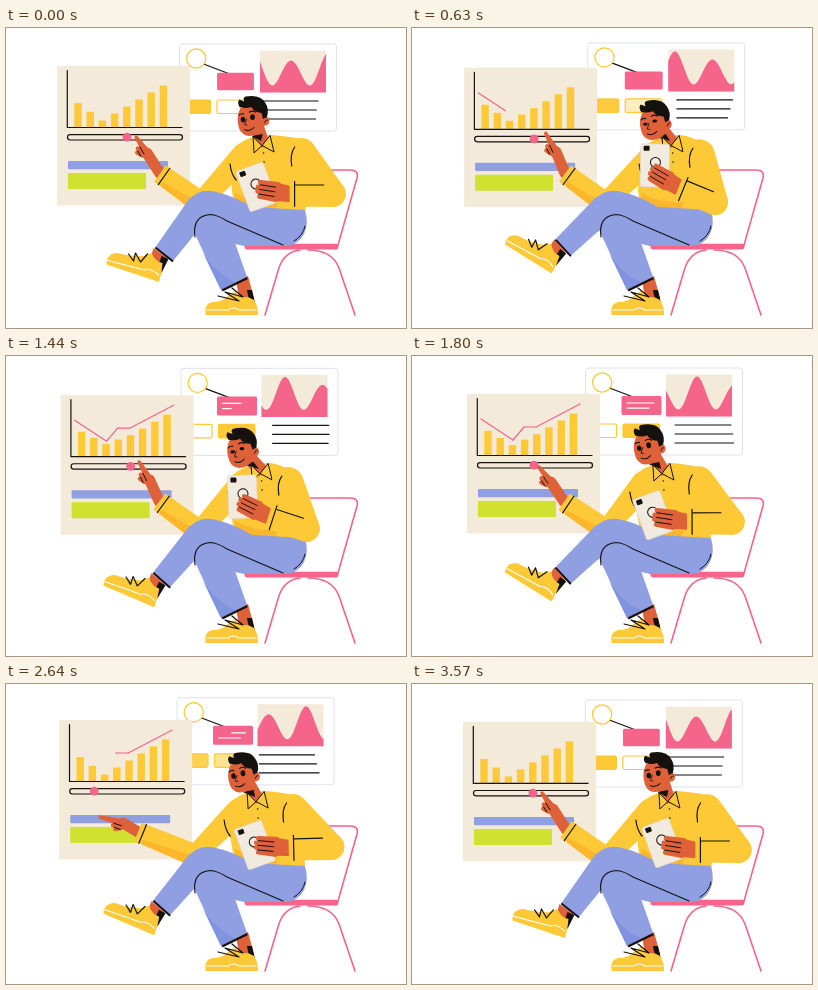
Write an HTML page that moves like this. It is 400 px wide and 300 px high and loops after 3.6 s.

```html
<!DOCTYPE html>
<html lang="en">
<head>
<meta charset="utf-8">
<title>Analyst at work</title>
<style>
html, body { margin: 0; width: 100%; height: 100%; overflow: hidden; background: #fff; }
svg { display: block; width: 400px; height: 300px; }
</style>
</head>
<body>
<svg id="stage" viewBox="0 0 400 300" stroke-linecap="round" stroke-linejoin="round"></svg>
<script>
const LOOP = 3600;
const YELLOW = '#fdc936', AMBER = '#fbb62c', PINK = '#f5648b', BLUE = '#909fe2', SHADE = '#8192de',
  GREEN = '#d0e22f', SKIN = '#de6139', BEIGE = '#f3ead9', INK = '#15110f';
const stage = document.getElementById('stage');

// ---- motion: a few signals drive everything ----
let now = 0, lean = 0, lift = 0, reach = 0;
const clamp = x => Math.max(0, Math.min(1, x));
const ramp = (a, b) => clamp((now - a) / (b - a));
const ease = (a, b) => (1 - Math.cos(Math.PI * ramp(a, b))) / 2;
const pulse = (a, b, c, d) => ease(a, b) * (1 - ease(c, d));
const swing = (peak, cycles = 1) => Math.cos(2 * Math.PI * cycles * (now - peak) / LOOP);

function setSignals(ms) {
  now = ms % LOOP;
  lean = 0.5 + 0.5 * swing(2200);           // torso towards the boards
  lift = pulse(200, 950, 1150, 1750);       // tablet up to the face
  reach = pulse(1650, 2450, 2750, 3560);    // slider dragged left
}
// A point at rest, moved sideways by lean and in any direction by lift and reach.
const joint = ([x, y], byLean, byLift, byReach) => [
  x + byLean * lean + byLift[0] * lift + byReach[0] * reach,
  y + byLift[1] * lift + byReach[1] * reach
];
const mix = (a, b, k) => [a[0] + (b[0] - a[0]) * k, a[1] + (b[1] - a[1]) * k];

// ---- drawing helpers ----
const r2 = x => Math.round(x * 100) / 100;
const xy = p => p.map(r2).join();
const fill = (d, c) => `<path d="${d}" fill="${c}"/>`;
const line = (d, c = INK, w = 1.2) => `<path d="${d}" fill="none" stroke="${c}" stroke-width="${w}"/>`;
const seg = (a, b, c, w) => line(`M${xy(a)}L${xy(b)}`, c, w);
const rect = (x, y, w, h, c, rx = 0, more = '') =>
  `<rect x="${r2(x)}" y="${r2(y)}" width="${r2(w)}" height="${r2(h)}" rx="${rx}" fill="${c}" ${more}/>`;
const oval = (x, y, rx, ry, c) => `<ellipse cx="${r2(x)}" cy="${r2(y)}" rx="${rx}" ry="${r2(ry)}" fill="${c}"/>`;
const group = (x, y, body, turn = '') => `<g transform="translate(${r2(x)} ${r2(y)}) ${turn}">${body}</g>`;
const rotate = (a, x = 0, y = 0) => `rotate(${r2(a)} ${x} ${y})`;

// Frame along a to b: shifts a point along and across that direction.
function axis(a, b) {
  const dx = b[0] - a[0], dy = b[1] - a[1], l = Math.hypot(dx, dy) || 1;
  return (p, along, across) => [p[0] + (dx * along - dy * across) / l, p[1] + (dy * along + dx * across) / l];
}
function limb(a, ra, b, rb, c, round = true) {
  const off = axis(a, b), end = round ? `A${rb},${rb} 0 0 1 ` : 'L';
  return fill(`M${xy(off(a, 0, ra))}A${ra},${ra} 0 0 1 ${xy(off(a, 0, -ra))}L${xy(off(b, 0, -rb))}`
    + `${end}${xy(off(b, 0, rb))}Z`, c);
}

// ---- boards ----
const TREND = [[14, 25], [46, 46], [57, 33], [69, 33], [113, 10]];

function trend(from, to) {
  const lens = TREND.slice(1).map((p, i) => Math.hypot(p[0] - TREND[i][0], p[1] - TREND[i][1]));
  const total = lens.reduce((a, b) => a + b);
  let s = 0, out = '';
  lens.forEach((l, i) => {
    const a = clamp((from * total - s) / l), b = clamp((to * total - s) / l);
    if (b > a) out += seg(mix(TREND[i], TREND[i + 1], a), mix(TREND[i], TREND[i + 1], b), PINK);
    s += l;
  });
  return out;
}

function chartBoard() {
  const swell = pulse(450, 1050, 1050, 2500);
  let s = rect(0, 0, 133, 139.5, BEIGE, 1);
  for (let i = 0; i < 8; i++) {
    const k = i - 2;
    const h = 6.5 + (k < 0 ? -8.7 : 7) * k + 7 * swell * Math.exp(-k * k / 1.6);
    s += rect(17.3 + i * 12.2, 61 - h, 7.4, h, YELLOW);
  }
  s += line('M10.3,4.5V61.5H125') + trend(ramp(2000, 3360), ramp(375, 1290));
  s += rect(10.5, 68.6, 115, 5.4, 'none', 2.7, `stroke="${INK}" stroke-width="1.2"`);
  s += oval(70 - 35 * reach, 71.2, 4.4, 4.4, PINK);
  s += rect(11, 95, 100, 8.3, BLUE, 1) + rect(11, 107, 78, 16, GREEN, 1);
  return group(53 - 2 * swing(0), 38 + 2 * swing(900), s);
}

function wave() {
  const peak = 74 + 75 * now / LOOP;
  let d = 'M80.5,48.5';
  for (let x = 80.5; x <= 146.5; x += 1.5) {
    const a = 2 * Math.PI * (x - peak) / 75;
    d += `L${x},${r2(41.5 - (29 + 4 * Math.cos(a)) * (0.5 + 0.5 * Math.cos(2 * a)))}`;
  }
  return fill(d + 'V48.5Z', PINK);
}

function reportBoard() {
  const edge = `stroke="${YELLOW}" stroke-width="1.2"`;
  let s = rect(0, 0, 157, 87, '#fff', 3, 'stroke="#d9dbea" stroke-width="0.8"');
  s += seg([24, 20], [49, 29.5]);
  s += `<circle cx="16.7" cy="14.5" r="9.6" fill="#fff" ${edge}/>`;

  const k = 0.92 + 0.08 * pulse(200, 1300, 2650, 3300);
  s += rect(56 - 20 * k, 37.5 - 9.5 * k, 40 * k, 19 * k, PINK, 1.5);
  for (const i of [0, 1]) {
    const w = 27 - 5 * i, x = 41.5, y = 35 + 5.2 * i;
    const a = ramp(2470 + 170 * i, 2820 + 170 * i), b = ramp(1200 + 100 * i, 1550 + 100 * i);
    if (b > a) s += seg([x + w * a, y], [x + w * b, y], '#fff');
  }

  const swap = pulse(400, 1000, 2300, 3000);
  const cell = (x, w, o) => rect(x, 56, w, 13.5, YELLOW, 1.5, `fill-opacity="${r2(o)}" ${edge}`);
  s += cell(6, 25, 1 - swap ** 3) + cell(37.5, 36.5, swap);

  for (let i = 0; i < 3; i++)
    s += seg([86.5 + 5.5 * swing(1250), 57 + 9 * i], [142 + 6 * swing(1250 + 250 * i), 57 + 9 * i]);
  s += rect(80.5, 6.5, 66, 42, BEIGE) + wave();
  return group(173.5 + 2.5 * swing(900), 14 + 2 * swing(0), s);
}

// ---- chair and legs ----
const CHAIR = line('M296,142H344Q353,142 351,150L332,217', PINK, 1.6)
  + line('M259,287L272,243Q277,224 294,222', PINK, 1.6)
  + line('M302,222Q326,222 333,240L349,287', PINK, 1.6)
  + rect(238.5, 215.8, 94, 5.6, PINK, 2.4);

const STANDING_FOOT = fill('M230,252L242,248L248,270L233,270Z', SKIN)
  + fill('M241,262L246,262L249,275L243,273Z', INK)
  + fill('M199.5,287Q198,275 207,274Q216,274 222,268L229,263Q233,270 242,269L248,272Q252,278 252,287Z', YELLOW)
  + line('M201,282H222Q227,278 233,282H250', '#fff', 1.1)
  + line('M212,268L233,273L219,264L237,269L226,260');

const STANDING_SHIN = fill('M189,206Q187,187 205,187Q219,188 228,212L241,249L215,262Z', BLUE)
  + fill('M197,225Q210,246 230,254.5L215,262Z', SHADE)
  + line('M217,262L240.5,250.5', INK, 2.4);

const THIGHS = fill('M183,172Q192,161 206,163Q226,167 246,179L299,182Q303,196 298,206Q292,217 280,218H238L190,207Z', BLUE)
  + line('M189,209Q186,188 204,186.5Q212,187 221,193L277,217', INK, 1.1)
  + line('M288,213Q297,208 299,198', INK, 1);

const SHOE = fill('M102,237.5Q102,226 113,226Q126,230 139,229L147,226Q151,235 158,236L157,245L154.5,255Z', YELLOW)
  + line('M103.5,233.5L140,243Q147,241 154,248', '#fff', 1.1)
  + line('M124,227L129,234L131,226L136,235L143,227');

function crossedLeg() {
  const up = 1 - swing(0, 3);
  const foot = fill('M149,221L163,231L156,243L146,231Z', SKIN)
    + fill('M157,229L164,232L157,246L154,238Z', INK) + SHOE;
  return group(0, 0, group(-1.5, -1, foot, rotate(2.3 * up, 157, 228))
    + fill('M183,171Q198,160 213,176L208,191L189,206L167,233L149.5,219Z', BLUE)
    + line('M150,220L166.5,233', INK, 2), rotate(4.5 * up, 197, 178));
}

// ---- upper body ----
function reachArm(neck) {
  const sh = [neck - 19, 128];
  const el = joint([194, 174], 0, [-2, 1], [-6, -3]);
  const cuff = joint([154, 145.5], 0, [-1.5, 0], [-22, 2.5]);
  const palm = joint([141, 125], 0, [5, -2], [-24, 14]);
  const tip = joint([130, 109], 0, [6, -6], [-36, 24]);
  const arm = axis(el, cuff), hand = axis(palm, tip);
  return limb(cuff, 5.5, palm, 5.5, SKIN) + limb(palm, 4, tip, 1.7, SKIN)
    + limb(hand(palm, 2, -3), 3, hand(palm, 9, -5), 2.2, SKIN)
    + limb(hand(palm, 1, -5), 2.6, hand(palm, 6, -8), 2, SKIN)
    + seg(hand(palm, 9, -2.5), hand(palm, 1, -3), INK, 1)
    + seg(hand(palm, 7, -6.5), hand(palm, 1, -7), INK, 1)
    + limb(sh, 13, el, 9, YELLOW) + limb(el, 11, cuff, 10, YELLOW, false)
    + limb(arm(el, 0, -6), 5, arm(cuff, -9, -7.5), 2.2, AMBER)
    + seg(arm(cuff, -5, 10), arm(cuff, -5, -10));
}

function torso(n, sh) {
  const x = v => r2(n + v);
  return fill(`M${x(-11)},109Q${x(-26)},114 ${x(-32)},126L226,163L230,186H299L${xy([sh[0] + 11, sh[1] + 10])}`
    + `L${xy([sh[0] - 4, sh[1] - 16])}Q${x(14)},107 ${x(6)},107Z`, YELLOW)
    + fill('M229,165Q250,176 272,174L268,184H231Z', AMBER)
    + line(`M${x(-33)},136Q${x(-32)},146 ${x(-27)},152`);
}

function collar(n) {
  const x = v => r2(n + v);
  return oval(n + 0.5, 125, 0.8, 0.8, INK) + oval(n + 1, 134, 0.8, 0.8, INK)
    + `<path d="M${x(-10)},109L${x(-9)},125L${x(-1)},117.5L${x(11)},124L${x(7)},107.5L${x(-1)},117.5Z" `
    + `fill="${YELLOW}" stroke="${INK}" stroke-width="1"/>`;
}

const HAIR = 'M235,80Q231,75 234,71.5L239,73.5Q237,70 240,68.5Q255,66 260,75Q264,81 261.5,89L257.5,91'
  + 'L256,85Q248,84 246,79Q240,81 235,79Z';

function headAndNeck(n) {
  const dx = 1 - 12 * lean - 6 * lift, open = 1 - lift;
  let s = fill('M235,80Q231,88 232.5,96Q234,107 243,108Q255,108 259,98L261,82L247,76Z', SKIN);
  s += oval(260, 93, 3.8, 4.6, SKIN) + line('M259,95Q260,91 262,92', INK, 0.8) + fill(HAIR, INK);
  s += oval(237.5, 91.5, 2.3, 0.6 + 2.2 * open, INK) + oval(247, 89, 2.4, 0.6 + 2.3 * open, INK);
  s += line('M233.5,87Q235.5,85 238,86M244,84Q247,82 250,84');
  s += line('M241,91L239,96.5L241.5,97', INK, 0.8) + line('M239,101.5Q244,104 248.5,99.5', INK, 1);
  return limb([252 + dx, 101], 7, [n - 1, 113], 6.5, SKIN)
    + fill(`M${r2(246 + dx)},108L${r2(257 + dx)},106L${r2(n - 2)},113Z`, INK)
    + collar(n) + group(dx, 6 * lift, s, rotate(-3 * lean - 6 * lift, 252, 106));
}

function tablet() {
  const [x, y] = joint([252, 159], -13, [-14, -35], [8, 2]);
  const s = rect(-14.5, -21.5, 29, 43, '#f1eade', 2, 'stroke="#e0d6c6" stroke-width="0.6"')
    + rect(-11.5, -19.5, 6, 5, INK, 1)
    + `<circle cx="0.5" cy="-3" r="5" fill="none" stroke="${INK}" stroke-width="1"/>`;
  return group(x, y, s, rotate(-20 + 34 * lift));
}

function holdArm(sh) {
  const el = joint([328, 166], -10, [-40, 13], [6, -3]);
  const wr = joint([285, 166], -12, [-29, -11], [8, -2]);
  const tip = joint([253, 161], -13, [-22, -29], [8, 0]);
  const palm = mix(wr, tip, 0.4), hand = axis(palm, tip), arm = axis(el, wr);
  let s = limb(wr, 8, palm, 9, SKIN);
  for (let i = 0; i < 4; i++) {
    const k = 7 - i * 4.7;
    s += limb(hand(palm, 0, k), 3, hand(tip, -((i - 1.3) ** 2), k), 2.3, SKIN);
    if (i) s += seg(hand(palm, 2, k + 2.3), hand(tip, -2, k + 2.3), INK, 1);
  }
  s += limb(sh, 16, el, 13, YELLOW) + limb(el, 13, wr, 12.5, YELLOW, false);
  s += seg(arm(wr, -5, 12.5), arm(wr, -5, -12.5)) + seg(arm(wr, -6, 9), arm(wr, -34, 9));
  return s + group(sh[0], sh[1], line('M-6,-7Q-11,0 -9,12'));
}

function draw(ms) {
  setSignals(ms);
  const neck = 258 - 8 * lean + 4 * lift;
  const sh = joint([296, 126], -11, [-14, 2], [0, 0]);
  stage.innerHTML = reportBoard() + chartBoard() + CHAIR
    + reachArm(neck) + torso(neck, sh)
    + STANDING_FOOT + crossedLeg() + STANDING_SHIN + THIGHS
    + headAndNeck(neck) + tablet() + holdArm(sh);
}

const start = performance.now();
function tick() {
  draw(performance.now() - start);
  requestAnimationFrame(tick);
}
tick();
</script>
</body>
</html>
```
